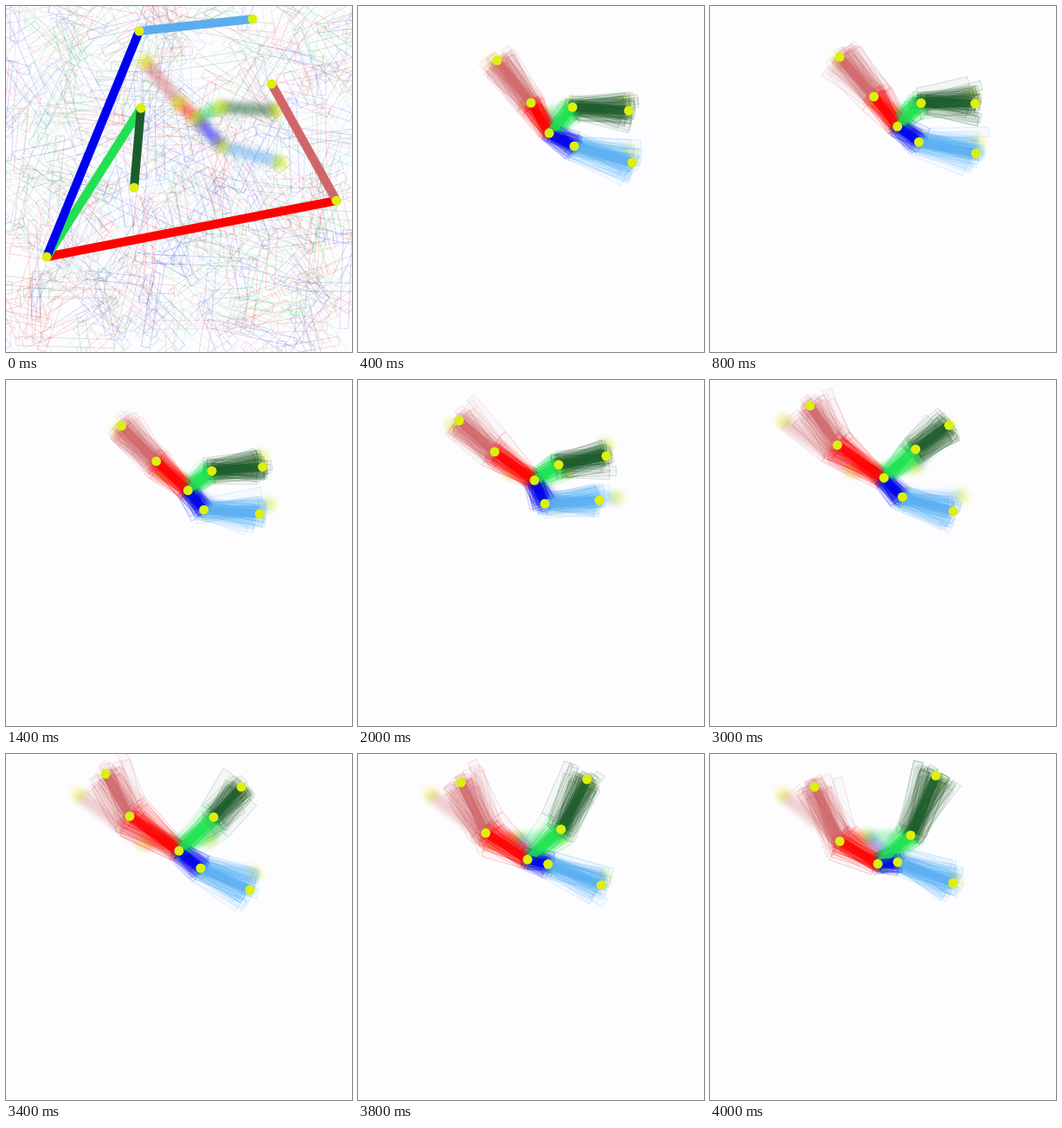
Write an HTML page with a canvas that moves like this. It is 400 px wide and 400 px high and loops after 4.2 s.

```html
<!DOCTYPE html>
<html>
<head>
<meta charset="utf-8">
<style>
html, body { margin: 0; width: 100%; height: 100%; overflow: hidden; background: #fdfdff; }
canvas { display: block; width: 100vmin; height: 100vmin; }
</style>
</head>
<body>
<canvas id="stage" width="400" height="400"></canvas>
<script>
const ctx = document.getElementById('stage').getContext('2d');
const LOOP = 4200, STEP = 200, YELLOW = '#dcf00c';

// Joints: 0 hub, then elbow and tip of the red, green and blue limbs
const LIMBS = [
  [0, 1, '#ff0000'], [1, 2, '#d0666a'],
  [0, 3, '#22e052'], [3, 4, '#1a5c2c'],
  [0, 5, '#0000f0'], [5, 6, '#5cacf0']
];
const points = text => text.split(' ').map(p => p.split(',').map(Number));
const START = points('47,290 382,225 307,90 156,118 148,210 154,29 285,15');
const KEYS = [
  [400, points('221,147 200,112 161,63 248,117 313,121 250,162 317,181')],
  [2000, points('204,116 158,83 117,47 232,98 287,88 216,143 279,139')],
  [3400, points('200,112 143,72 115,23 240,73 272,38 225,132 282,157')],
  [4000, points('194,127 150,101 121,38 232,94 261,25 217,125 281,149')]
];

const clamp = k => Math.min(1, Math.max(0, k));
const smooth = k => k * k * (3 - 2 * k);
const mix = (a, b, k) => a.map((p, i) => p.map((v, j) => v + (b[i][j] - v) * k));

function poseAt(t) {
  const i = Math.max(1, KEYS.findIndex(key => key[0] >= t));
  const [t0, a] = KEYS[i - 1], [t1, b] = KEYS[i];
  return mix(a, b, clamp((t - t0) / (t1 - t0)));
}

// The blurred figure drifts steadily; its red tip arrives early
function ghostAt(t) {
  const k = t / LOOP, e = smooth(clamp(t / 3200));
  const p = mix(KEYS[0][1], KEYS[3][1], k);
  p[0] = [220 - 42 * k, 130 - 36 * k];
  p[2] = [161 - 77 * e, 64 - 17 * e];
  p[6][1] -= 30 * Math.sin(Math.PI * k);
  return p;
}

function seeded(seed) {
  let s = seed * 7919 + 17;
  return () => {
    s = (s + 0x6d2b79f5) | 0;
    let t = Math.imul(s ^ (s >>> 15), 1 | s);
    t ^= t + Math.imul(t ^ (t >>> 7), 61 | t);
    return ((t ^ (t >>> 14)) >>> 0) / 4294967296;
  };
}

function bar([x, y], [x2, y2], color, width, fill, line) {
  ctx.save();
  ctx.translate(x, y);
  ctx.rotate(Math.atan2(y2 - y, x2 - x));
  ctx.beginPath();
  ctx.rect(0, -width / 2, Math.hypot(x2 - x, y2 - y), width);
  ctx.fillStyle = ctx.strokeStyle = color;
  ctx.lineWidth = 0.7;
  if (fill) { ctx.globalAlpha = fill; ctx.fill(); }
  if (line) { ctx.globalAlpha = line; ctx.stroke(); }
  ctx.restore();
}

function dots(pose, r) {
  ctx.fillStyle = YELLOW;
  for (const [x, y] of pose) {
    ctx.beginPath();
    ctx.arc(x, y, r, 0, 2 * Math.PI);
    ctx.fill();
  }
}

const figure = (p, width, fill, line) =>
  LIMBS.forEach(([a, b, color]) => bar(p[a], p[b], color, width, fill, line));

function ghost(pose, strength) {
  ctx.save();
  ctx.filter = 'blur(3px)';
  figure(pose, 14, strength);
  ctx.globalAlpha = strength;
  dots(pose, 9);
  ctx.restore();
}

const reach = ([x, y], angle, len) => [x + len * Math.cos(angle), y + len * Math.sin(angle)];

function scatter(rand) {
  for (let i = 0; i < 720; i++) {
    const a = [rand() * 400, rand() * 400];
    const b = reach(a, rand() * 2 * Math.PI, 25 + rand() * 90);
    bar(a, b, LIMBS[i % 6][2], 10, 0, 0.22);
  }
}

// Swing each limb segment by a small random angle
function vary(pose, rand, spread) {
  const jitter = d => (rand() + rand() - 1) * d * spread;
  const p = [pose[0].map(v => v + jitter(9))];
  for (const [from, to] of LIMBS) {
    const dx = pose[to][0] - pose[from][0], dy = pose[to][1] - pose[from][1];
    p[to] = reach(p[from], Math.atan2(dy, dx) + jitter(0.32), Math.hypot(dx, dy) * (1 + jitter(0.1)));
  }
  return p;
}

function draw(step) {
  const t = step * STEP, rand = seeded(step + 1);
  ctx.globalAlpha = 1;
  ctx.fillStyle = '#fdfdff';
  ctx.fillRect(0, 0, 400, 400);
  if (step === 0) scatter(rand);
  ghost(ghostAt(t), step ? 0.3 : 0.5);
  const pose = step ? poseAt(t) : START;
  if (step) {
    const spread = step === 1 ? 1.6 : 1;
    for (let i = 0; i < 48; i++) figure(vary(pose, rand, spread), 11, 0.04, 0.26);
  }
  figure(pose, 10, step ? 0.75 : 1);
  dots(pose, 5.5);
}

let shown = -1;
const begin = performance.now();
function tick() {
  const step = Math.floor(((performance.now() - begin) % LOOP) / STEP);
  if (step !== shown) draw(shown = step);
  requestAnimationFrame(tick);
}
tick();
</script>
</body>
</html>
```
